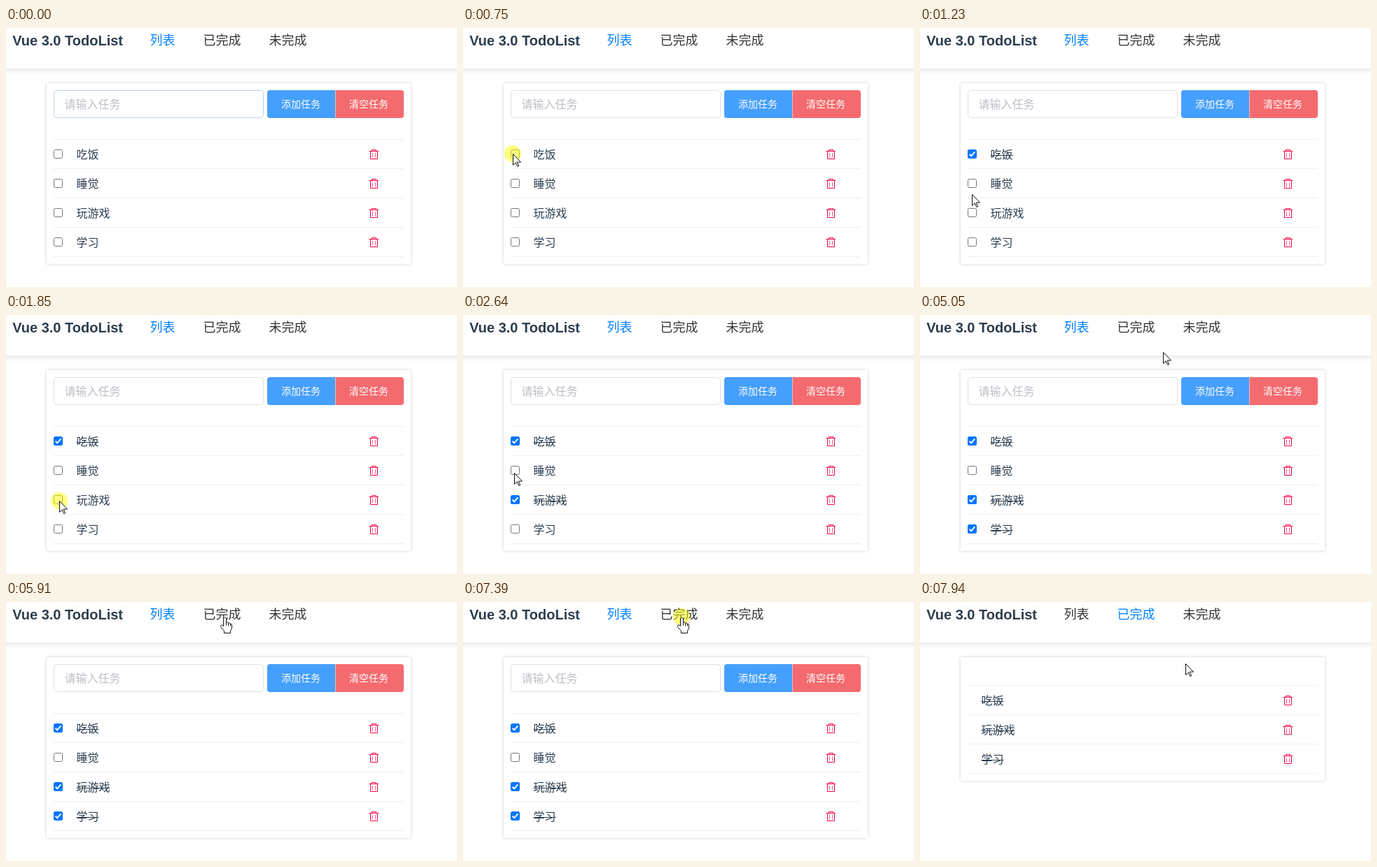
Animation of 644 by 371 pixels, one loop 8 s. Source, as an HTML page with a canvas:

```html
<!DOCTYPE html>
<html lang="zh-CN">
<head>
<meta charset="utf-8">
<title>TodoList</title>
<style>
html, body { margin: 0; width: 100%; height: 100%; overflow: hidden; background: #fff; }
canvas { display: block; width: 644px; height: 371px; }
</style>
</head>
<body>
<canvas id="stage"></canvas>
<script>
const W = 644, H = 371, LOOP = 8000, TICK = 78.125;
const LEFT = 68, WIDTH = 500, ROW = 42;
const CJK = '"Noto Sans CJK SC", "Noto Sans CJK", sans-serif';
const INK = '#2c3e50', LINE = '#ebeef0', BLUE = '#459ffc', RED = '#f46b6f';
const SHOW = 140, SWITCH = 7470;

const canvas = document.getElementById('stage');
const ctx = canvas.getContext('2d');
const dpr = window.devicePixelRatio || 1;
canvas.width = W * dpr;
canvas.height = H * dpr;

const tabs = ['列表', '已完成', '未完成'];
// done: the moment a task gets ticked
const tasks = [
  { name: '吃饭', done: 840 },
  { name: '睡觉', done: Infinity },
  { name: '玩游戏', done: 2010 },
  { name: '学习', done: 4740 }
];

// pointer moves: each starts where the one before ended
const home = { x: 150, y: 287 };
const moves = [
  { from: SHOW, to: 670, x: 71, y: 180 },
  { from: 840, to: 1460, x: 76, y: 266 },
  { from: 2010, to: 2400, x: 73, y: 226 },
  { from: 4035, to: 4110, x: 82, y: 253 },
  { from: 4110, to: 4430, x: 74, y: 306 },
  { from: 4740, to: 5050, x: 347, y: 53 },
  { from: 5050, to: 5460, x: 326, y: 41 },
  { from: 5620, to: 5910, x: 312, y: 21 },
  { from: 7540, to: 7940, x: 379, y: 88 }
];

const arrow = new Path2D('M0 0V16L3.7 12.4L6.3 18L8.2 17.2L5.7 11.6H11Z');
const hand = new Path2D('M5 13V2Q7 -1 9 2V8Q11 6 12 9Q14 7 15 10Q17 9 17 12V16L15 20V23H6V20L1 14Q1 9 5 13Z' +
  'M9 8V12M12 9V13M15 10V13');
const bin = new Path2D('M518.5 2.5H532M522.5 2.5V.5H528.5V2.5M520.5 2.5V13.5H530.5V2.5');
const bars = new Path2D('M523.5 5V11.5M527.5 5V11.5');
const tick = new Path2D('M2.6 6.8L5.2 9.4L10.4 3.4');

const clamp = v => Math.max(0, Math.min(1, v));
const smooth = v => v * v * (3 - 2 * v);
const lerp = (a, b, k) => a + (b - a) * k;

function text(str, x, y, size, color, weight = 400) {
  ctx.font = `${weight} ${size}px ${CJK}`;
  ctx.fillStyle = color;
  ctx.fillText(str, x, y);
}

function rect(x, y, w, h, color, radius = 0) {
  ctx.fillStyle = color;
  ctx.beginPath();
  ctx.roundRect(x, y, w, h, radius);
  ctx.fill();
}

function outline(x, y, w, h, color, radius) {
  ctx.strokeStyle = color;
  ctx.lineWidth = 1;
  ctx.beginPath();
  ctx.roundRect(x + .5, y + .5, w - 1, h - 1, radius);
  ctx.stroke();
}

function strokeAt(shape, x, y, color, width = 1) {
  ctx.save();
  ctx.translate(x, y);
  ctx.strokeStyle = color;
  ctx.lineWidth = width;
  ctx.stroke(shape);
  ctx.restore();
}

function panel(x, y, w, h, radius, blur, alpha) {
  ctx.save();
  ctx.shadowColor = `rgba(0,0,0,${alpha})`;
  ctx.shadowBlur = blur * dpr;
  rect(x, y, w, h, '#fff', radius);
  ctx.restore();
}

function rule(y) {
  rect(LEFT, y, WIDTH, 1, LINE);
}

function header(active) {
  panel(-20, -20, W + 40, 78, 0, 10, .17);
  ctx.font = 'bold 20px "Liberation Sans", Arial, sans-serif';
  ctx.fillStyle = INK;
  ctx.fillText('Vue 3.0 TodoList', 9.2, 25);
  let x = 205.5;
  tabs.forEach((name, i) => {
    text(name, x, 24, 18, i === active ? '#007fff' : '#333');
    x += name.length * 18 + 40;
  });
}

function button(label, x, color, corners) {
  rect(x, 89, 98, 40, color, corners);
  text(label, x + 20, 114, 14, '#fff', 500);
}

function form(t) {
  // the focus ring fades to grey
  const k = clamp(t / 100);
  outline(LEFT, 89, 300, 40, `rgb(${lerp(188, 220, k)},${lerp(210, 223, k)},${lerp(236, 230, k)})`, 4);
  text('请输入任务', 83.5, 114.5, 16, '#babec6');
  button('添加任务', 373, BLUE, [4, 0, 0, 4]);
  button('清空任务', 470, RED, [0, 4, 4, 0]);
  rect(470, 89, 1, 40, '#f9b5b7');
}

function checkbox(x, y, on) {
  rect(x, y, 13, 13, on ? '#0075ff' : '#fff', 2.5);
  if (on) strokeAt(tick, x, y, '#fff', 2);
  else outline(x, y, 13, 13, '#767676', 2);
}

function row(name, x, y, done) {
  text(name, x, y + 28, 16, INK);
  if (done) rect(x, y + 23, name.length * 16, 1, INK);
  strokeAt(bin, 0, y + 15, '#f8003f');
  strokeAt(bars, 0, y + 15, '#f6608c');
  rule(y + ROW);
}

function page(t) {
  const filtered = t >= SWITCH;
  const list = filtered ? tasks.filter(task => t >= task.done) : tasks;
  const top = filtered ? 119 : 159;
  panel(58, 79, WIDTH + 20, top + list.length * ROW - 68, 2, 4, .2);
  if (!filtered) form(t);
  rule(top);
  list.forEach(({ name, done }, i) => {
    const y = top + i * ROW;
    if (!filtered) checkbox(LEFT, y + 15, t >= done);
    row(name, filtered ? 87.5 : 100.5, y, t >= done);
  });
}

function pointerAt(t) {
  const s = (Math.floor(t / TICK - .57) + .57) * TICK + 6;
  return moves.reduce((p, m) => {
    const k = smooth(clamp((s - m.from) / (m.to - m.from)));
    return { x: lerp(p.x, m.x, k), y: lerp(p.y, m.y, k) };
  }, home);
}

function pointer(t) {
  if (t < SHOW) return;
  const p = pointerAt(t), x = Math.round(p.x), y = Math.round(p.y);
  const held = (end, span) => t >= end - span && t < end;
  if (held(SWITCH, 80) || tasks.some(task => held(task.done, 170))) {
    ctx.fillStyle = 'rgba(255,255,0,.5)';
    ctx.beginPath();
    ctx.arc(x, y, 12, 0, Math.PI * 2);
    ctx.fill();
  }
  const onTab = y < 28;
  const shape = onTab ? hand : arrow;
  ctx.save();
  ctx.translate(x + (onTab ? -6.5 : .5), y + .5);
  ctx.fillStyle = '#fff';
  ctx.fill(shape);
  ctx.restore();
  strokeAt(shape, x + (onTab ? -6.5 : .5), y + .5, '#111');
}

function draw(t) {
  ctx.setTransform(dpr, 0, 0, dpr, 0, 0);
  rect(0, 0, W, H, '#fff');
  header(t >= SWITCH ? 1 : 0);
  page(t);
  pointer(t);
}

const start = performance.now();
function loop(now) {
  draw(Math.max(0, now - start) % LOOP);
  requestAnimationFrame(loop);
}
draw(0);
requestAnimationFrame(loop);
</script>
</body>
</html>
```
